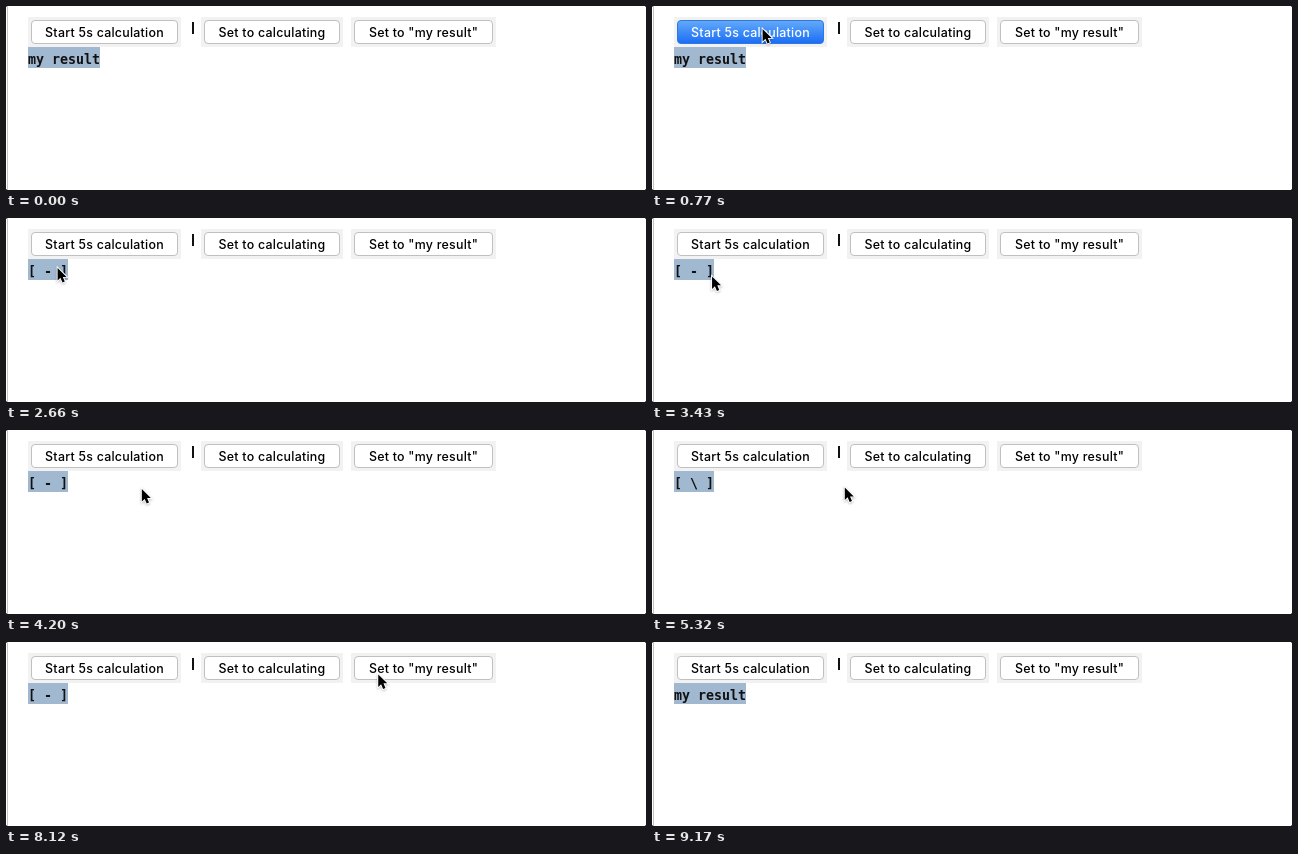
An HTML page that plays this animation: 640x184 px, repeating every 9.59 s.

```html
<!DOCTYPE html>
<html lang="en">
<head>
<meta charset="utf-8">
<title>Calculation spinner</title>
<style>
  html, body { margin: 0; width: 100%; height: 100%; overflow: hidden; background: #fff; }
  svg { display: block; width: 640px; height: 184px; }
  .panel { fill: #f2f2f2; }
  .face { fill: #fff; stroke: #c0c0c0; }
  .label { font: 500 12.4px Inter, sans-serif; letter-spacing: .25px; text-anchor: middle; }
  .pressed .face { fill: url(#blue); stroke: #2f78e0; }
  .pressed .label { fill: #fff; }
  #output { font: bold 13.3px "DejaVu Sans Mono", monospace; white-space: pre; fill: #111; }
  #arrow { filter: drop-shadow(0 1px 1px #0004); }
</style>
</head>
<body>
<svg viewBox="0 0 640 184">
  <defs>
    <linearGradient id="blue" x2="0" y2="1">
      <stop stop-color="#64aafa"/>
      <stop offset="1" stop-color="#1a6df5"/>
    </linearGradient>
  </defs>
  <rect x="1" width="1" height="184" fill="#c4c4c4"/>
  <path d="M0 0h1v1h-1zM639 0h1v1h-1zM0 183h1v1h-1zM639 183h1v1h-1z" fill="#666"/>
  <g id="buttons"></g>
  <rect x="186" y="16" width="2" height="12" fill="#111"/>
  <rect id="selection" x="22" y="41" height="21" fill="#a1b8d1"/>
  <text id="output" x="22" y="58"></text>
  <g id="pointer">
    <circle id="ring" cy="1" r="21.3" fill="none" stroke="#111" stroke-width="1.7"/>
    <path id="arrow" transform="translate(.6 1) scale(.92)"
          d="M0 0V13.6L3.1 10.7L5.3 15.8L7.8 14.7L5.7 9.7H9.8Z"
          stroke="#fff" stroke-width="2" paint-order="stroke"/>
  </g>
</svg>
<script>
const LOOP = 9590, STEP = 70, TICK = 210;
const $ = id => document.getElementById(id);
const smooth = k => k * k * (3 - 2 * k);
const slowDown = k => 1 - (1 - k) ** 2;

const buttons = [
  { x: 22, width: 153, text: 'Start 5s calculation', down: 630, up: 840 },
  { x: 195, width: 142, text: 'Set to calculating', down: 7000, up: 7210 },
  { x: 345, width: 145, text: 'Set to "my result"', down: 8400, up: 8680 },
];
$('buttons').innerHTML = buttons.map(({ x, width, text }) => `<g>
  <rect class="panel" x="${x}" y="11" width="${width}" height="30"/>
  <rect class="face" x="${x + 3.5}" y="14.5" width="${width - 7}" height="23" rx="3.5"/>
  <text class="label" x="${x + width / 2}" y="31">${text}</text></g>`).join('');
const buttonNodes = [...$('buttons').children];

const calculations = [
  { start: 840, end: 6160 },
  { start: 7210, end: 8820 },
];

const entry = { x: 290, y: 184 };
const moves = [
  { start: 0, end: 630, x: 110, y: 22, ease: slowDown },
  { start: 1400, end: 1820, x: 38, y: 68 },
  { start: 1820, end: 2660, x: 51, y: 49 },
  { start: 2660, end: 3780, x: 62, y: 60 },
  { start: 3780, end: 4480, x: 175, y: 57 },
  { start: 5040, end: 5950, x: 208, y: 56, ease: slowDown },
  { start: 6440, end: 6860, x: 257, y: 29 },
  { start: 7770, end: 8260, x: 400, y: 32 },
  { start: 8960, end: 9170, x: 335, y: 184 },
];

function pointerAt(t) {
  let { x, y } = entry;
  for (const { start, end, ease = smooth, ...to } of moves) {
    const k = ease(Math.min(1, Math.max(0, (t - start) / (end - start))));
    x += (to.x - x) * k;
    y += (to.y - y) * k;
  }
  return [x, y];
}

function outputAt(t) {
  const run = calculations.find(({ start, end }) => t >= start && t < end);
  return run ? `[ ${'-\\|/'[Math.floor((t - run.start) / TICK) % 4]} ]` : 'my result';
}

function draw(now) {
  const t = Math.floor(now % LOOP / STEP) * STEP;
  const output = outputAt(t);
  $('output').textContent = output;
  $('selection').setAttribute('width', output.length * 8);

  $('pointer').setAttribute('transform', `translate(${pointerAt(t)})`);
  $('pointer').style.display = t >= STEP && t < 9170 ? '' : 'none';
  const clicking = buttons.some(({ down }) => t >= down && t < down + 2 * STEP);
  $('ring').style.display = clicking ? '' : 'none';
  buttons.forEach(({ down, up }, i) =>
    buttonNodes[i].classList.toggle('pressed', t >= down + STEP && t < up));
}

const start = performance.now();
function frame() {
  draw(performance.now() - start);
  requestAnimationFrame(frame);
}
frame();
</script>
</body>
</html>
```
